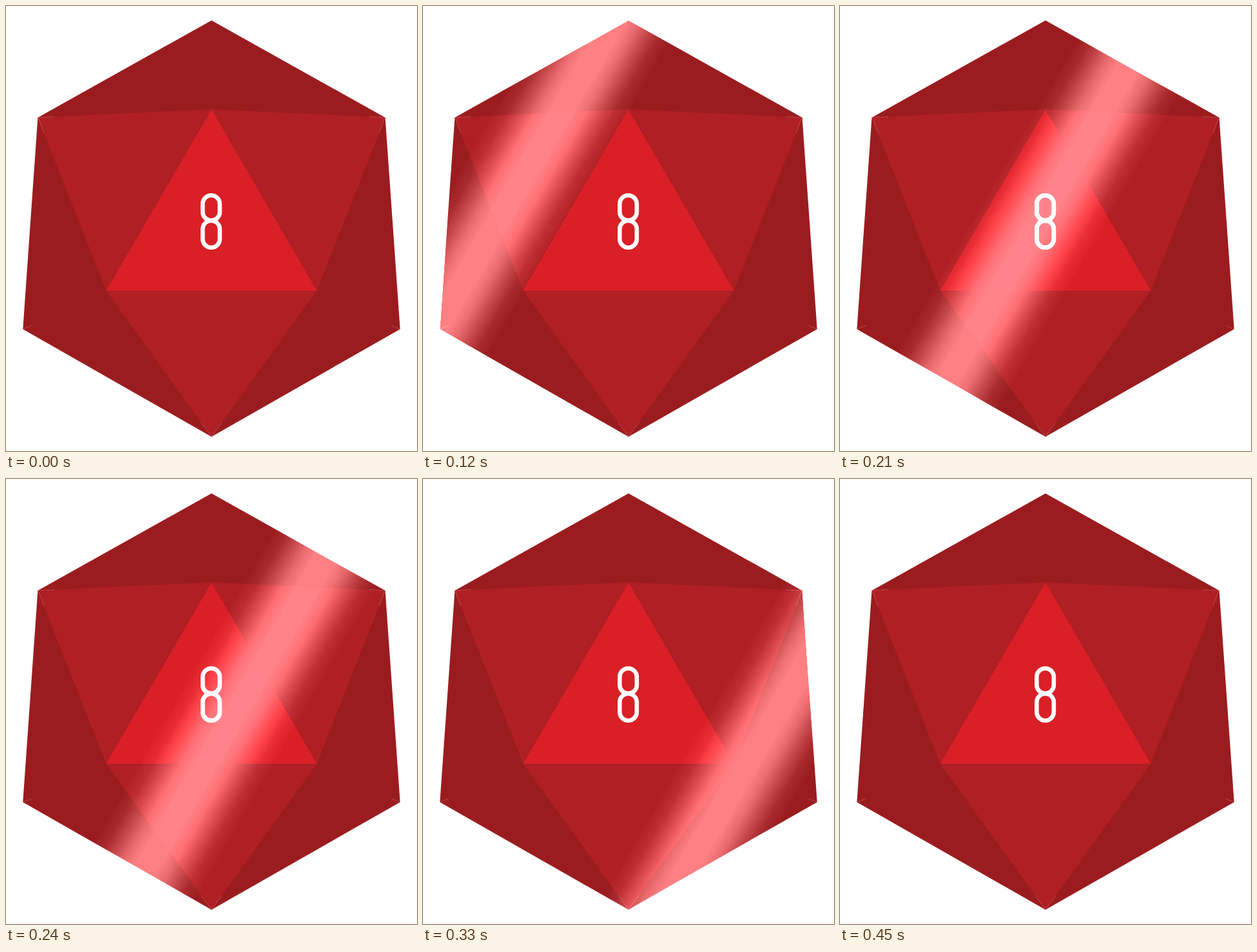
Recreate the animation shown at these times as an HTML page. Size 640 by 694 pixels, loop 4500 ms.

```html
<!DOCTYPE html>
<html lang="en">
<head>
<meta charset="utf-8">
<title>Shining die</title>
<style>
  html, body { margin: 0; width: 100%; height: 100%; overflow: hidden; background: #fff; }
  svg { display: block; width: 640px; height: 694px; }
  .shine { mix-blend-mode: plus-lighter; }
  .band { animation: sweep 4500ms infinite; }
  /* 15 jumps of 30 ms, then rest outside the die */
  @keyframes sweep {
    0% { transform: translateX(45.8px); animation-timing-function: steps(15, end); }
    10%, 100% { transform: translateX(882.8px); }
  }
</style>
</head>
<body>
<svg viewBox="0 0 640 694" role="img" aria-label="8">
  <defs>
    <linearGradient id="glow">
      <stop offset="0" stop-color="#fff" stop-opacity="0"/>
      <stop offset=".11" stop-color="#fff" stop-opacity=".06"/>
      <stop offset=".21" stop-color="#fff" stop-opacity=".175"/>
      <stop offset=".31" stop-color="#fff" stop-opacity=".31"/>
      <stop offset=".41" stop-color="#fff" stop-opacity=".392"/>
      <stop offset=".59" stop-color="#fff" stop-opacity=".392"/>
      <stop offset=".69" stop-color="#fff" stop-opacity=".31"/>
      <stop offset=".79" stop-color="#fff" stop-opacity=".175"/>
      <stop offset=".89" stop-color="#fff" stop-opacity=".06"/>
      <stop offset="1" stop-color="#fff" stop-opacity="0"/>
    </linearGradient>
    <g id="glints">
      <path d="M50 174L75 172.6M51 176L59 198M27 503.5L40 498.5M319 670L304 650"/>
    </g>
  </defs>
  <rect width="640" height="694" fill="#fff"/>

  <!-- faces -->
  <path fill="#9b1c1f" d="M320 22.5L590.5 174L613.7 504L320 671.7L26.3 504L49.5 174Z"/>
  <path fill="#af1f24" d="M320 161L590.5 174L484 444L320 671.7L156 444L49.5 174Z"/>
  <path fill="#da1f26" d="M320 161.5L484 444H156Z"/>

  <!-- hairline glints at the corners -->
  <g fill="none" stroke="#e8b0a8" stroke-opacity=".5" stroke-width=".6">
    <use href="#glints"/>
    <use href="#glints" transform="matrix(-1 0 0 1 640 0)"/>
  </g>

  <!-- numeral -->
  <g fill="none" stroke="#fff" stroke-width="6.6">
    <rect x="306.3" y="295.3" width="26.6" height="39.3" rx="13.3"/>
    <rect x="306.3" y="334.6" width="26.6" height="42.2" rx="13.3"/>
  </g>

  <g class="shine" transform="rotate(30)">
    <rect class="band" x="-92" y="-400" width="184" height="1200" fill="url(#glow)"/>
  </g>
</svg>
</body>
</html>
```
